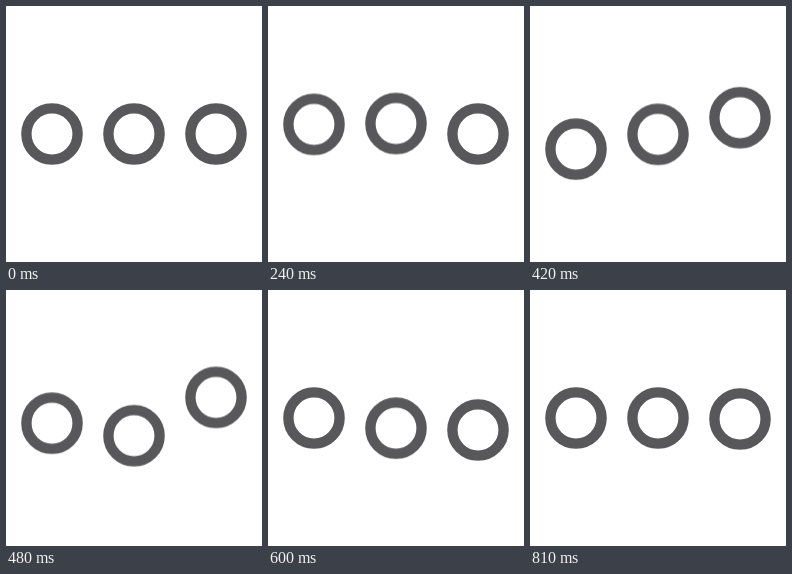
Animation, 256 px wide and 256 px high, one loop 0.84 s. Source, as an HTML page:

```html
<!DOCTYPE html>
<html lang="en">
<head>
<meta charset="utf-8">
<title>Loading</title>
<style>
  html, body { margin: 0; width: 100%; height: 100%; overflow: hidden; background: #fff; }
  svg { display: block; width: 100%; height: 100%; }
  circle { fill: none; stroke: #58585a; stroke-width: 10.4; }
</style>
</head>
<body>
<svg viewBox="0 0 256 256">
  <circle cx="46" cy="128" r="25.6"/>
  <circle cx="128" cy="128" r="25.6"/>
  <circle cx="210" cy="128" r="25.6"/>
</svg>
<script>
  const LOOP = 840, STEP = 180, SWING = 20.6;
  const soft = 'cubic-bezier(.333, 0, .667, 1)';
  const firm = 'cubic-bezier(.46, 0, .54, 1)';
  const rings = [
    { delay: 0, easing: soft },
    { delay: 150, easing: soft },
    { delay: 300, easing: firm }
  ];

  // Each ring rises, drops below its rest line and settles back.
  function bounce(el, { delay, easing }) {
    const key = (time, y) => ({
      offset: time / LOOP,
      transform: `translateY(${y}px)`,
      easing
    });
    const frames = [0, -SWING, SWING, 0].map((y, i) => key(delay + i * STEP, y));
    if (delay > 0) frames.unshift(key(0, 0));
    if (delay + 3 * STEP < LOOP) frames.push(key(LOOP, 0));
    el.animate(frames, { duration: LOOP, iterations: Infinity });
  }

  document.querySelectorAll('circle').forEach((el, i) => bounce(el, rings[i]));
</script>
</body>
</html>
```
